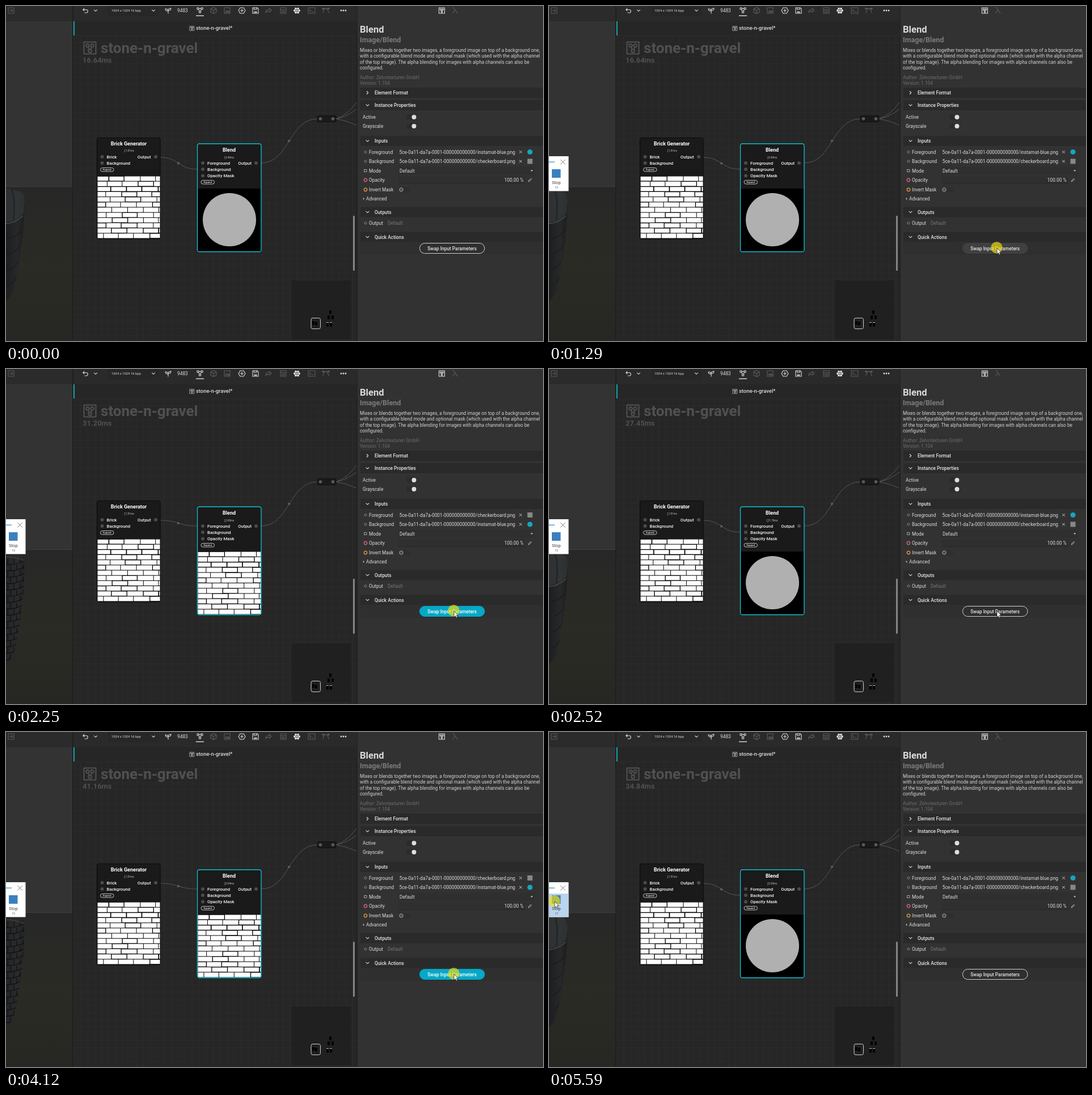
Write an HTML page that moves like this. It is 947x591 px and loops after 5.64 s.

```html
<!DOCTYPE html>
<html lang="en">
<head>
<meta charset="utf-8">
<title>Blend node</title>
<style>
html, body { margin: 0; width: 100%; height: 100%; overflow: hidden; background: #262626; }
svg { display: block; }
text { font-family: Roboto, sans-serif; white-space: pre; }
.win text { font-family: "Open Sans", sans-serif; }
.btn rect { fill: none; stroke: #cfcfcf; }
.btn text { fill: #e4e4e4; }
.btn.hover rect { fill: #404040; stroke: #404040; }
.btn.down rect { fill: #05a8c6; stroke: #05a8c6; }
.btn.down text { fill: #fff; transform: translateY(.5px); }
.btn.done rect { stroke: #10aeca; }
.btn.done text { fill: #10aeca; }
</style>
</head>
<body>
<svg id="stage" width="947" height="591" viewBox="0 0 947 591"></svg>
<script>
const LOOP = 5640, UI = 8.32;
const INK = '#dcdcdc', DIM = '#5c5c5c', CYAN = '#0cc3d4';

const text = (x, y, s, size = UI, fill = INK, weight = 400, anchor = 'start', id = '') =>
  `<text x="${x}" y="${y}" font-size="${size}" fill="${fill}" font-weight="${weight}" text-anchor="${anchor}"${id && ` id="${id}"`}>${s}</text>`;
const rect = (x, y, w, h, fill, more = '') =>
  `<rect x="${x}" y="${y}" width="${w}" height="${h}" fill="${fill}" ${more}/>`;
const dot = (x, y, r, fill, more = '') => `<circle cx="${x}" cy="${y}" r="${r}" fill="${fill}" ${more}/>`;
const line = (d, stroke, w = 1, more = '') =>
  `<path d="${d}" fill="none" stroke="${stroke}" stroke-width="${w}" ${more}/>`;
const icon = (x, y, d, stroke = INK, w = 1.1) =>
  line(d, stroke, w, `transform="translate(${x} ${y})" stroke-linecap="round" stroke-linejoin="round"`);

const DOWN = 'M-2.5-1.2L0 1.2L2.5-1.2', RIGHT = 'M-1.2-2.5L1.2 0L-1.2 2.5';
const CROSS = 'M-2-2L2 2M2-2L-2 2';
const ring = r => `M${-r} 0a${r} ${r} 0 1 0 ${2 * r} 0a${r} ${r} 0 1 0 ${-2 * r} 0`;
const box = r => `M${-r} ${-r}h${2 * r}v${2 * r}h${-2 * r}z`;
const GRAPH = box(5) + 'M-3.2-2a1.3 1.3 0 1 0 2.6 0a1.3 1.3 0 1 0-2.6 0M.6-2a1.3 1.3 0 1 0 2.6 0a1.3 1.3 0 1 0-2.6 0M-1.3 2.5a1.3 1.3 0 1 0 2.6 0a1.3 1.3 0 1 0-2.6 0M-1.5-.8L-.7 1.3M1.5-.8L.7 1.3';

function rng(seed) {
  return () => (seed = (seed * 16807) % 2147483647) / 2147483647;
}

// Running bond: twelve courses, a few bricks shrunk for wider joints.
function wall(x, y, size) {
  const rnd = rng(77), h = size / 12, w = size / 4;
  let s = rect(0, 0, size, size, '#000');
  for (let r = 0; r < 12; r++) {
    let left = (r % 2 ? 13 : 23.5) - w + (rnd() - .5) * 5;
    while (left < size) {
      const len = w + (rnd() - .5) * 3, gap = rnd() < .22 ? 1.7 : 1;
      s += rect(left + gap / 2, r * h + gap / 2, len - gap, h - gap, '#fff');
      left += len;
    }
  }
  return `<svg x="${x}" y="${y}" width="${size}" height="${size}">${s}</svg>`;
}

function wire(x0, y0, x1, y1) {
  const mx = (x0 + x1) / 2, my = (y0 + y1) / 2;
  return line(`M${x0} ${y0}C${mx} ${y0} ${mx} ${y1} ${x1} ${y1}`, '#565656') +
    `<path d="M${mx - 2} ${my - 2.5}l4.5 2.5l-4.5 2.5z" fill="#666"/>`;
}

const pin = (x, y) => dot(x, y, 3, '#4b4b4b');
const label = (x, y, s, anchor) => text(x, y + 2.8, s, 7.8, '#f2f2f2', 500, anchor);
const expand = (x, y) =>
  rect(x, y, 23.5, 6.5, 'none', 'rx="3.2" stroke="#d8d8d8" stroke-width=".9"') +
  text(x + 11.8, y + 4.9, 'Expand', 4.4, '#fff', 500, 'middle');

function leftSide() {
  let ribs = '', bricks = '';
  for (let i = 0; i < 5; i++) {
    const y = 384 + i * 27;
    ribs += line(`M0 ${y}Q16 ${y - 1} ${30 - i * 3.2} ${y - 14}`, i ? '#1a1b1c' : '#4b4e50', 1.4);
  }
  for (let i = 0; i < 16; i++) {
    const y = 345 + i * 11.2, edge = 32 - i * i * .07;
    bricks += line(`M0 ${y}Q${edge * .7} ${y} ${edge} ${y - 7}`, '#111213', 1.5);
    for (let k = 0; k < 3; k++) {
      const x = 3 + k * 11 + (i % 2) * 5;
      if (x < edge) bricks += line(`M${x} ${y - 1 - k}v-9`, '#111213', 1.3);
    }
  }
  const body = 'M0 322L24 327Q33 330 33 345Q32 390 25 440Q18 490 12 505Q7 515 0 522Z';
  return rect(0, 0, 117, 27, '#2b2b2b') + rect(0, 27, 117, 291, '#333') +
    icon(9, 8, box(5) + 'M-2.5 0H2.5M.7-2L2.6 0L.7 2', '#5a5a5a') +
    rect(0, 319, 117, 272, 'url(#floor)') +
    `<path d="${body}" fill="url(#drum)"/>` +
    `<g id="drumA"><path d="M0 322L24 327Q33 330 33 345L31 366Q18 380 0 382Z" fill="#36393b" opacity=".7"/>${line('M10 324Q17 340 13 378', '#242628', 3)}${ribs}</g>` +
    `<g id="drumB"><path d="${body}" fill="#2a2c2e" opacity=".55"/><g clip-path="url(#drumClip)">${bricks}</g>${line('M0 331Q20 332 32 338', '#45484a', 1.2)}</g>` +
    `<clipPath id="drumClip"><path d="${body}"/></clipPath>` +
    rect(117, 0, 2, 591, '#1f1f1f') + rect(0, 318, 117, 1.2, '#3c3c3c');
}

function toolbar() {
  return rect(119, 0, 500, 27, '#2a2a2a') + rect(119, 27, 500, 25, '#262626') +
    rect(119, 27, 1.6, 25, CYAN) + rect(180, 0, 90, 18, '#272727') +
    icon(140, 8, 'M-4-1.5H1.5a2.7 2.7 0 0 1 0 5.5H-1M-2-3.7L-4.2-1.5L-2 .7') +
    icon(158, 8, DOWN) + text(186, 10.2, '1024 x 1024 16 bpp', 5.9) + icon(260, 8, DOWN) +
    icon(286, 8, 'M0 5V-1M0 1Q-5 1-5-3Q0-3 0 1M0 0Q0-4 5-4Q5 0 0 0') + text(302, 11, '9483', 8.4) +
    icon(342, 7, 'M-5-4h3v3h-3zM2-4h3v3h-3zM-1.5 2h3v3h-3zM-2-2.5H2M-3-1L-.5 2M3-1L.5 2') +
    rect(335, 16.5, 14, 1.4, '#ddd') +
    icon(366, 8, 'M0-5.5L5-3V3L0 5.5L-5 3V-3ZM-5-3L0 0L5-3M0 0V5.5', DIM) +
    icon(390, 8, box(5) + 'M-3 3L-1 0L1 2L2.5 .5L4 3Z', DIM) +
    icon(416, 8, 'M-3-5H3L6 0L3 5H-3L-6 0ZM-2.5 0H2.5M0-2.5V2.5') +
    icon(440, 8, 'M-5-5H3L5-3V5H-5ZM-2.5-5V-2H2V-5M-2 2h4v1.5h-4z') +
    icon(463, 8, 'M1-4L5-.5L1 3V1Q-4 1-5 4Q-5-2 1-2Z', DIM) +
    icon(489, 8, box(5) + 'M-5-1.5H5M-3 1H3M-3 3H3', DIM) +
    [0, 1, 2, 3, 4, 5].map(i => dot(513 + 4 * Math.cos(i * Math.PI / 3), 8 + 4 * Math.sin(i * Math.PI / 3), 1.9, '#ddd')).join('') +
    dot(513, 8, 1.6, '#ddd') +
    icon(539, 8, 'M-6-5H6V5H-6ZM-3.5-2L-1.5 0L-3.5 2M0 2H3', DIM) +
    icon(564, 8, 'M-5-3.5H5M-5 4Q-4-3 0-3.5Q4-3 5 4M-6-4.5h2v2h-2zM4-4.5h2v2h-2z', DIM) +
    [591, 595, 599].map(x => dot(x, 8, 1.4, '#ddd')).join('') +
    icon(328, 39.5, GRAPH, INK, .9).replace('translate(328 39.5)', 'translate(328 39.5) scale(.75)') +
    text(335, 42.4, 'stone-n-gravel*', 9.4, INK, 500);
}

function canvasArea() {
  const mini = [[570, 537], [567, 546], [574, 546], [565, 559], [571, 559], [540, 556], [545, 557]];
  return rect(119, 52, 500, 539, 'url(#grid)') +
    icon(148, 74, GRAPH, '#505050', 1).replace('translate(148 74)', 'translate(148 74) scale(2.1)') +
    text(167, 83, 'stone-n-gravel', 26, '#505050', 700) +
    text(135, 99.6, '', 13, '#505050', 700, 'start', 'total') +
    `<g id="wireA">${wire(272, 267, 337, 288)}</g><g id="wireB">${wire(272, 267, 337, 277)}</g>` +
    wire(450, 277, 549, 199) +
    line('M582 199Q603 192 618 170M582 199Q600 196 618 182M582 199Q600 202 618 210', '#565656') +
    rect(549, 193.5, 33, 11, '#1a1a1a', 'rx="2" stroke="#101010"') + dot(554.5, 199, 2.8, '#5a5a5a') + dot(576.5, 199, 2.8, '#5a5a5a') +
    rect(160.5, 232.5, 111.5, 178.5, '#1a1a1a', 'rx="3.5" stroke="#0c0c0c" stroke-width="1.2"') +
    text(216.5, 246.3, 'Brick Generator', 9, '#fff', 700, 'middle') +
    text(217, 257, '∑1.81ms', 4.5, '#c8c8c8', 400, 'middle') +
    pin(169.5, 266) + label(177.5, 266, 'Brick') + pin(169.5, 277) + label(177.5, 277, 'Background') +
    label(255.5, 266, 'Output', 'end') + pin(264, 266) + expand(166.5, 285.5) + wall(161.5, 300, 110) +
    rect(337.5, 243, 112.5, 190.5, '#1a1a1a', 'rx="3.5"') +
    text(393.5, 257.2, 'Blend', 9, '#fff', 700, 'middle') +
    text(393.5, 268.6, '', 4.5, '#c8c8c8', 400, 'middle', 'cost') +
    pin(347, 277) + label(355, 277, 'Foreground') + pin(347, 288) + label(355, 288, 'Background') +
    pin(347, 299.5) + label(355, 299.5, 'Opacity Mask') +
    label(433, 277, 'Output', 'end') + pin(441, 277) + expand(344, 307.5) +
    `<g id="viewA">${rect(338.5, 322, 111, 111, '#000')}${dot(394, 377, 47, '#b0b0b0')}</g>` +
    `<g id="viewB">${wall(338.5, 322, 111)}</g>` +
    rect(337.5, 243, 112.5, 190.5, 'none', `rx="3.5" stroke="${CYAN}" stroke-width="1.3"`) +
    rect(612, 370, 3, 97, '#858585', 'rx="1"') +
    rect(504, 484, 104.5, 104, '#202020') +
    mini.map(([x, y]) => rect(x, y, 4, 6.5, '#000')).join('') +
    line('M565 558.5h4M571 558.5h4', '#bbb') +
    rect(538, 550.5, 16.5, 19, 'none', 'rx="3" stroke="#d0d0d0"') + rect(618, 0, 2, 591, '#222');
}

const section = (y, name, open = true) =>
  rect(625, y - 9, 322, 18, '#2a2a2a') + icon(637.5, y, open ? DOWN : RIGHT) +
  text(650, y + 3, name, UI, '#e6e6e6', 500);

const blueIcon = y => dot(924, y, 4.6, '#18a5bd');
const checkIcon = y => rect(919.5, y - 4.5, 9, 9, 'url(#check)');
const file = (y, name) => text(898, y + 3, '5ce-0a11-da7a-0001-000000000000/' + name + '.png', UI, INK, 400, 'end');

function panel() {
  const about = [
    'Mixes or blends together two images, a foreground image on top of a background one,',
    'with a configurable blend mode and optional mask (which used with the alpha channel',
    'of the top image). The alpha blending for images with alpha channels can also be',
    'configured.'];
  const row = (y, s, x = 640) => text(x, y + 3, s);
  const toggle = y => rect(706, y - 4.5, 19, 9, '#2b2b2b', 'rx="4.5"') + dot(719.5, y, 4, '#dedede');
  const port = (y, color) => icon(634, y, ring(2), color, .9);
  return rect(620, 0, 327, 591, '#323232') +
    icon(768.5, 8, GRAPH) + icon(792, 8, 'M-4-5H-2.5L4 5M-.3-1L-4 5', DIM) +
    text(624, 47, 'Blend', 16.64, '#dadada', 700) + text(624, 63.6, 'Image/Blend', 12.6, '#7b7b7b', 700) +
    about.map((s, i) => text(624, 81 + i * 10.25, s, UI, '#d2d2d2')).join('') +
    text(624, 129.2, 'Author: Zelvotexturen GmbH', UI, '#6c6c6c') + text(624, 139.4, 'Version: 1.104', UI, '#6c6c6c') +
    section(153, 'Element Format', false) + section(175, 'Instance Properties') +
    row(196, 'Active', 629) + toggle(196) + row(212, 'Grayscale', 629) + toggle(212) +
    section(238, 'Inputs') +
    port(257.5, '#8a8a8a') + row(257.5, 'Foreground') + port(274, '#8a8a8a') + row(274, 'Background') +
    icon(907.5, 257.5, CROSS, INK, .9) + icon(907.5, 274, CROSS, INK, .9) +
    `<g id="filesA">${file(257.5, 'instamat-blue')}${blueIcon(257.5)}${file(274, 'checkerboard')}${checkIcon(274)}</g>` +
    `<g id="filesB">${file(257.5, 'checkerboard')}${checkIcon(257.5)}${file(274, 'instamat-blue')}${blueIcon(274)}</g>` +
    rect(692, 283.5, 240, 14, '#2f2f2f') + icon(634, 290.5, box(2), '#b5b5b5', .9) + row(290.5, 'Mode') +
    text(694, 293.5, 'Default') + `<path d="M925 289.5h4.4l-2.2 2.4z" fill="#ccc"/>` +
    rect(692, 300.5, 224, 13, '#2f2f2f') + rect(692, 313, 224, 1, '#272727') +
    icon(634, 307, ring(2.7), '#d5607f', 1.5) + row(307, 'Opacity') +
    text(912.5, 310, '100.00 %', UI, INK, 400, 'end') + icon(924, 307, 'M-2.5 2.5L-2 .8L1.5-2.7L2.7-1.5L-.8 2Z', '#ccc', .9) +
    icon(634, 324, ring(2.7), '#d9924a', 1.5) + row(324, 'Invert Mask') +
    rect(692.5, 319.5, 21, 9, '#2e2e2e', 'rx="4.5"') + dot(697, 324, 3.2, '#484848', 'stroke="#a5a5a5"') +
    `<path d="M629.8 338l2.2 2l-2.2 2z" fill="#ccc"/>` + row(340, 'Advanced', 635) +
    section(363.5, 'Outputs') + port(383, '#8a8a8a') + row(383, 'Output') + text(673, 386, 'Default', UI, '#777') +
    section(407.5, 'Quick Actions') +
    `<g id="headHover">${rect(625, 398.5, 322, 18, '#3b3b3b')}${icon(637.5, 407.5, DOWN)}${text(650, 410.5, 'Quick Actions', UI, '#fff', 500)}</g>` +
    rect(625, 417, 322, 22, '#2f2f2f') +
    `<g id="button" class="btn">${rect(729.5, 418.5, 114.5, 18, 'none', 'rx="9"')}${text(786.7, 430.5, 'Swap Input Parameters', UI, INK, 500, 'middle')}</g>`;
}

const recorder = () => `<g id="win" class="win">` +
  rect(0, 265, 34.5, 61.5, '#fff') + `<g id="stopHover">${rect(0, 285, 34.5, 41.5, '#b9d4ee')}</g>` +
  rect(0, 274.6, 10, 1.2, '#3b84bd') + icon(24.5, 275.3, 'M-4-4L4 4M4-4L-4 4', '#777', 1) +
  rect(5, 288, 15.5, 15, '#3a80bf') +
  text(13, 314, 'Stop', 7.4, '#222', 400, 'middle') + text(13.5, 321.6, 'F8', 5, '#777', 400, 'middle') + '</g>';

const defs = `<defs>
  <pattern id="grid" width="12.3" height="12.3" patternUnits="userSpaceOnUse" x="119" y="52">
    <rect width="13" height="13" fill="#262626"/><path d="M.5 0V13M0 .5H13" stroke="#2b2b2b"/></pattern>
  <pattern id="check" width="3" height="3" patternUnits="userSpaceOnUse">
    <rect width="3" height="3" fill="#4a4a4a"/><path d="M0 0h1.5v1.5H0zM1.5 1.5H3V3H1.5z" fill="#c4c4c4"/></pattern>
  <linearGradient id="floor" x2="0" y2="1"><stop stop-color="#272727"/><stop offset=".5" stop-color="#2b2b25"/><stop offset="1" stop-color="#262722"/></linearGradient>
  <linearGradient id="drum"><stop stop-color="#1d1e1f"/><stop offset=".6" stop-color="#272829"/><stop offset="1" stop-color="#1b1c1d"/></linearGradient>
</defs>`;

const stage = document.getElementById('stage');
stage.innerHTML = defs + leftSide() + canvasArea() + toolbar() + panel() + recorder() +
  dot(0, 0, 10.3, '#f0e010', 'id="click" opacity=".67"') +
  `<path id="cursor" d="M0 0V10.6L2.5 8.4L4.2 12L6 11.2L4.4 7.7H7.6Z" fill="#fff" stroke="#111" stroke-width=".7"/>`;
const el = {};
stage.querySelectorAll('[id]').forEach(n => el[n.id] = n);

// Each move: start, end, points taken at even steps.
const moves = [
  [330, 390, [[705, 416], [708, 417]]],
  [530, 1070, [[708, 416], [709, 414], [712, 411], [717, 409], [725, 410], [736, 414], [750, 421], [764, 428], [775, 431], [783, 429], [787, 427], [789, 425]]],
  [1110, 1150, [[789, 426], [790, 427]]],
  [4620, 4910, [[784, 427], [690, 406], [500, 384], [290, 381], [120, 404], [42, 430], [22, 436]]],
  [5280, 5590, [[21, 452], [18, 481], [14, 440], [10, 372], [9, 322], [10, 304], [10, 299]]]
];
function cursorAt(t) {
  let p = null;
  for (const [from, to, pts] of moves) {
    if (t < from) break;
    const i = Math.floor((t - from) / (to - from) * (pts.length - 1) + 1e-6);
    p = pts[Math.min(i, pts.length - 1)];
  }
  return p;
}

const at = (steps, t) => steps.reduce((v, s) => t >= s[0] ? s[1] : v, undefined);
const button = [[0, ''], [770, 'hover'], [1420, 'down'], [1490, 'done'], [1550, '']];
for (const [press, release, idle] of [[2250, 2410, 2460], [3160, 3320, 3380], [4120, 4290, 4340]])
  button.push([press, 'down'], [release, 'done'], [idle, '']);
const swapped = [[0, 0], [1550, 1], [2460, 0], [3380, 1], [4340, 0]];
const rendered = [[0, 0], [1550, 1], [2520, 0], [3450, 1], [4390, 0]];
const totals = [[0, '16.64'], [1550, '31.20'], [2520, '27.45'], [3450, '41.16'], [4390, '34.84']];
const costs = [[0, '0.40'], [1550, '0.90'], [2460, '21.70'], [3380, '0.04'], [4340, '0.30']];
const clicks = [[1290, 1420], [2250, 2360], [3160, 3270], [4120, 4240], [5590, LOOP]];

const show = (id, on) => el[id].style.display = on ? '' : 'none';
const pair = (id, b) => { show(id + 'A', !b); show(id + 'B', b); };

function draw(t) {
  const p = cursorAt(t), swap = at(swapped, t);
  ['files', 'wire', 'view'].forEach(id => pair(id, swap));
  pair('drum', at(rendered, t));
  el.total.textContent = at(totals, t) + 'ms';
  el.cost.textContent = '∑' + at(costs, t) + 'ms';
  el.button.setAttribute('class', 'btn ' + at(button, t));
  show('headHover', t >= 530 && t < 750);
  show('win', t >= 330);
  show('stopHover', p && p[0] < 34 && p[1] < 326);
  show('cursor', p);
  show('click', clicks.some(([a, b]) => t >= a && t < b));
  if (p) {
    el.cursor.setAttribute('transform', `translate(${p[0]} ${p[1]})`);
    el.click.setAttribute('transform', `translate(${p[0] - .5} ${p[1] - .8})`);
  }
}

const start = performance.now();
function tick() {
  draw((performance.now() - start) % LOOP);
  requestAnimationFrame(tick);
}
tick();
</script>
</body>
</html>
```
